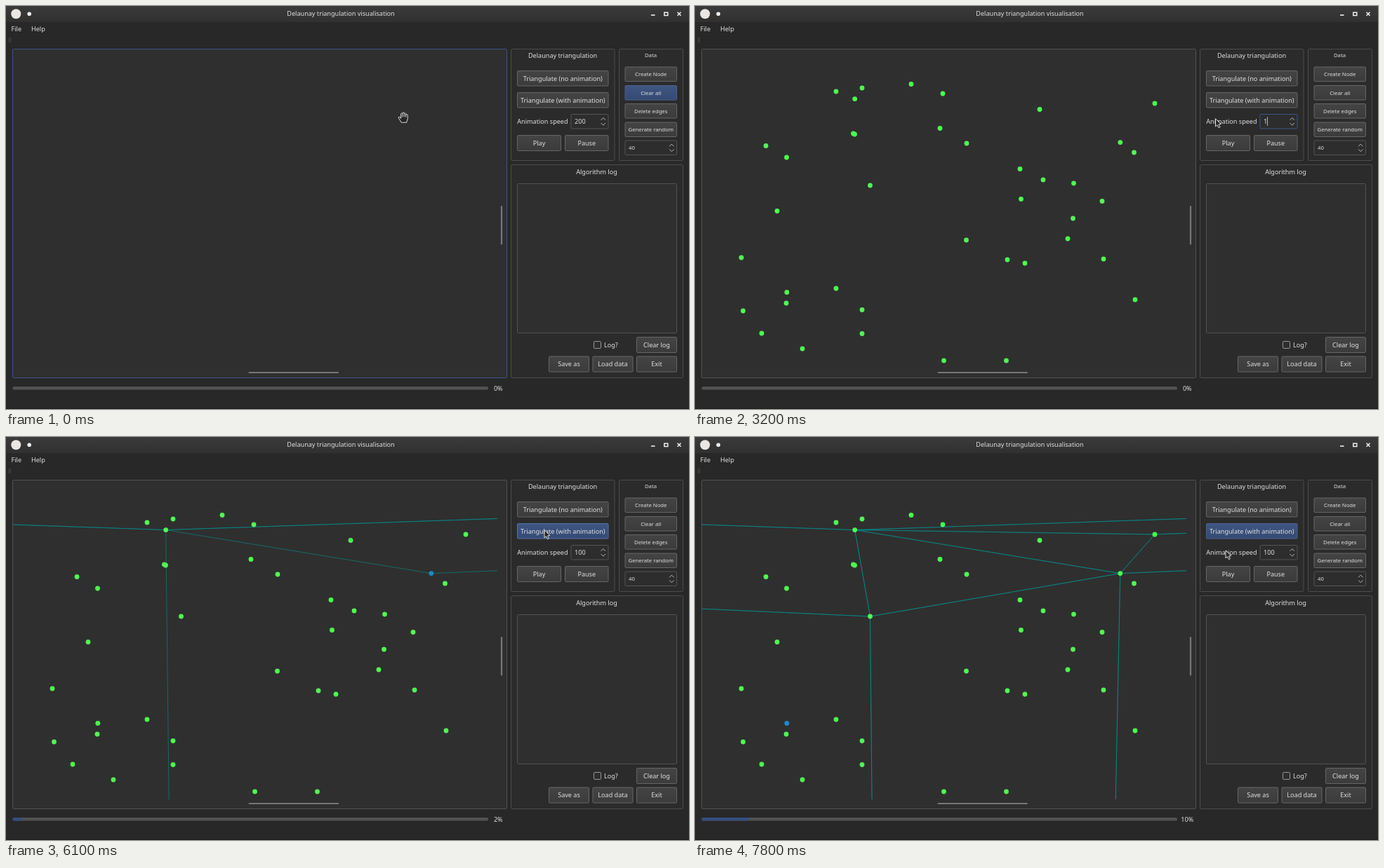
An HTML page that plays this animation: 973x575 px, repeating every 8 s.

```html
<!DOCTYPE html>
<html lang="en">
<head>
<meta charset="utf-8">
<title>Delaunay triangulation visualisation</title>
<style>
  html, body { margin: 0; width: 100%; height: 100%; overflow: hidden; background: #282828; }
  svg { display: block; width: 973px; height: 575px; font-family: "Noto Sans", sans-serif; }
  text { fill: #e0e0e0; white-space: pre; }
</style>
</head>
<body>
<svg id="stage" viewBox="0 0 973 575"></svg>
<script>
const LOOP = 8000, STEP = 100;
const BLUE = '#3b5688', BIG = 9.1, SMALL = 7.72;

// x, y, w, h, label, font size
const buttons = [
  [728.5, 92.5, 129.5, 21.5, 'Triangulate (no animation)', BIG],
  [728.5, 123.5, 129.5, 21.5, 'Triangulate (with animation)', BIG],
  [728.5, 184.5, 62, 22, 'Play', BIG],
  [796.5, 184.5, 61.5, 22, 'Pause', BIG],
  [882, 87, 73.5, 20.5, 'Create Node', SMALL],
  [882, 113.5, 73.5, 20.5, 'Clear all', SMALL],
  [882, 139.5, 73.5, 20.5, 'Delete edges', SMALL],
  [882, 166, 73.5, 20.5, 'Generate random', SMALL],
  [898.5, 472.5, 57, 22, 'Clear log', BIG],
  [773.5, 500, 57, 22, 'Save as', BIG],
  [836, 500, 57, 22, 'Load data', BIG],
  [898.5, 500, 57, 22, 'Exit', BIG]
];
const view = [9.5, 61.5, 704, 469];
const speedBox = [805, 154.5, 53, 20.5];

const nodes = [
  [201, 122], [238, 117], [308, 111.5], [353, 125], [491, 147.5], [225.5, 182], [227.5, 183],
  [349, 174.5], [387, 196], [625.5, 209], [101, 199.5], [130.5, 216], [463, 232.5], [496, 248],
  [539.5, 253], [464.5, 275.5], [580, 278.5], [117, 292.5], [538.5, 303], [531, 332],
  [386.5, 334], [445, 362], [470, 367], [582, 361], [66, 359], [201, 403], [130, 424],
  [68.5, 435], [238, 433.5], [627, 419], [95, 467], [238, 467.5], [153, 489], [354.5, 506], [443.5, 506]
];
// L, R and D are the far corners of the enclosing triangle
const corner = {
  L: [-11300, -270], R: [12000, -270], D: [365, 12000],
  a: [227.7, 132.6], b: [605.8, 194.6], c: [249.5, 256], d: [655, 139], e: [130.8, 408.5]
};
// corners, added at, removed at
const triangles = [
  ['aLR', 5500], ['aRD', 5600, 6000], ['aLD', 5700, 6600],
  ['baR', 6100, 7400], ['bRD', 6200], ['bDa', 6300, 6600],
  ['cLD', 6800], ['caL', 6900], ['cab', 7000], ['cbD', 7100],
  ['dab', 7500], ['dbR', 7600], ['daR', 7700]
];

// time, x, y of the pointer
const path = [
  [0, 566, 159], [500, 566, 159], [800, 838, 137], [1000, 838, 137], [1100, 876, 166],
  [1500, 900, 174], [1600, 900, 174], [1700, 902, 178], [2200, 902, 178], [2300, 900, 176],
  [2500, 838, 162], [2600, 838, 162], [3000, 741.5, 160.5], [4000, 741.5, 160.5], [4200, 745, 165],
  [4600, 767, 132.5], [6700, 767, 132.5], [6800, 764, 145], [7200, 756, 161.5], [LOOP, 756, 161.5]
];

// the last value whose time has come
const at = (t, keys) => keys.filter(k => k[0] <= t).pop()[1];

function pointer(t) {
  const i = path.findIndex(k => k[0] > t);
  const [t0, x0, y0] = path[i - 1], [t1, x1, y1] = path[i];
  const f = (t - t0) / (t1 - t0);
  return [x0 + (x1 - x0) * f, y0 + (y1 - y0) * f];
}

const inside = ([px, py], [x, y, w, h]) => px >= x && px <= x + w && py >= y && py <= y + h;

const rect = ([x, y, w, h], fill, stroke = 'none', r = 1.2) =>
  `<rect x="${x}" y="${y}" width="${w}" height="${h}" rx="${r}" fill="${fill}" stroke="${stroke}"/>`;
const text = (x, y, s, size = BIG, anchor = 'middle') =>
  `<text x="${x}" y="${y + size * .36}" font-size="${size}" text-anchor="${anchor}">${s}</text>`;
const line = (d, stroke, w = 1) =>
  `<path d="${d}" fill="none" stroke="${stroke}" stroke-width="${w}"/>`;
const dot = ([x, y], r, fill) => `<circle cx="${x}" cy="${y}" r="${r}" fill="${fill}"/>`;

function spin(box, value, size, stroke) {
  const [x, y, w, h] = box, cx = x + w - 7.2, cy = y + h / 2;
  return rect(box, '#2d2d2d', stroke) + text(x + 5, cy, value, size, 'start') +
    line(`M${cx - 3.2} ${cy - 2}l3.2-3.2 3.2 3.2M${cx - 3.2} ${cy + 2.2}l3.2 3.2 3.2-3.2`, '#c8c8c8', .9);
}

function button(b, focus, hover, press) {
  const fill = press ? '#2f446c' : focus ? 'url(#active)' : 'url(#plain)';
  const stroke = hover ? '#5673a8' : focus ? '#4a628f' : '#666';
  return rect(b, fill, stroke) + text(b[0] + b[2] / 2, b[1] + b[3] / 2, b[4], b[5]);
}

const defs = `<defs>
  <linearGradient id="bar" x2="0" y2="1"><stop stop-color="#3b3b3b"/><stop offset="1" stop-color="#303030"/></linearGradient>
  <linearGradient id="plain" x2="0" y2="1"><stop stop-color="#444"/><stop offset="1" stop-color="#3b3b3b"/></linearGradient>
  <linearGradient id="active" x2="0" y2="1"><stop stop-color="#3f5682"/><stop offset="1" stop-color="#344a74"/></linearGradient>
  <clipPath id="scene"><path d="M10 62H700V517H10Z"/></clipPath></defs>`;

const frame = defs + rect([0, 0, 973, 575], '#282828', 'none', 0) +
  rect([0, 0, 973, 23], 'url(#bar)', 'none', 0) + line('M0 574.5H973', '#1c1c1c') +
  dot([14.3, 11.3], 7, '#ece6e2') + dot([33.2, 11.2], 2.8, '#eee') +
  text(477, 11, 'Delaunay triangulation visualisation') +
  line('M919 13H924.5', '#f0f0f0', 1.6) + line('M937.8 9.2H942.8V13.6H937.8Z', '#f0f0f0', 1.5) +
  line('M956.5 8.8l5 5M961.5 8.8l-5 5', '#f0f0f0', 1.5) +
  text(7.5, 33, 'File', BIG, 'start') + text(36, 33, 'Help', BIG, 'start') +
  line('M4.5 45V52M6.7 45V52', '#505050', .8) +
  rect([719.5, 61.5, 147.5, 159], '#2b2b2b', '#4c4c4c') + text(793, 71, 'Delaunay triangulation') +
  rect([873.5, 61.5, 91, 159], '#2b2b2b', '#4c4c4c') + text(918.5, 70.5, 'Data', SMALL) +
  rect([719.5, 226.5, 245, 304], '#2b2b2b', '#4c4c4c') + text(841.5, 236.5, 'Algorithm log') +
  rect([728.5, 253.5, 227, 213], '#2f2f2f', '#525252') +
  text(728.3, 165, 'Animation speed', BIG, 'start') +
  spin([882, 192, 73.5, 20.5], '40', SMALL, '#555') +
  rect([837.5, 478.5, 10, 10], '#2e2e2e', '#999') + text(852, 483.5, 'Log?', BIG, 'start');

function graph(t) {
  if (t < 1700) return '';
  const active = at(t, [[0, ''], [5200, 'a'], [5800, 'b'], [6400, 'c'], [7200, 'd'], [7800, 'e']]);
  const edges = triangles.filter(([, from, to = LOOP]) => t >= from && t < to)
    .map(([names]) => line('M' + [...names].map(n => corner[n]).join('L') + 'Z', '#009a9a99', .9)).join('');
  return `<g clip-path="url(#scene)">${edges}</g>` +
    nodes.map(p => dot(p, 3.4, '#4dff50')).join('') +
    [...'abcde'].map(n => dot(corner[n], 3.4, n === active ? '#1b8acb' : '#4dff50')).join('');
}

function speed(t, p) {
  const focused = t >= 2700 && t < 4800;
  const value = at(t, [[0, '200'], [3200, '1'], [3400, '10'], [3500, '100']]);
  const stroke = focused || inside(p, speedBox) ? BLUE : '#555';
  let s = spin(speedBox, value, BIG, stroke);
  if (focused && t < 3200) {
    const x = Math.max(810, p[0]);
    s += rect([x, 158, 826 - x, 13], '#4f78bf88', 'none', 0);
  } else if (focused) {
    s += line(`M${810.3 + value.length * 5.2} 158.5V171`, '#ddd', .8);
  }
  return s;
}

function cursor([x, y]) {
  const hand = 'M-2.8 7.2L-6.7.8Q-7.3-1-5.5-1L-3.4 1.4V-5.2Q-2.3-7-1.2-5.4V-6.4Q0-8 1.2-6.4V-5.6' +
    'Q2.5-7 3.6-5.2V-3.8Q5.2-5.2 6.2-3.6V2L4.5 7.2ZM-1.2-5.4V-.6M1.2-5.6V-.6M3.6-4V-.4';
  const arrow = 'M0 .3V11.4L2.5 9.2 4.5 13.2 6.4 12.3 4.6 8.4 7.8 8Z';
  return `<path transform="translate(${x} ${y})" d="${x < 714 ? hand : arrow}" fill="#262626"
    stroke="#f0f0f0" stroke-width=".9" stroke-linejoin="round"/>`;
}

function draw(t) {
  const p = pointer(t);
  const focus = at(t, [[0, 'Clear all'], [1700, 'Generate random'], [2700, ''], [4800, 'Triangulate (with animation)']]);
  const percent = at(t, [[0, 0], [5800, 2], [6400, 5], [7200, 7], [7800, 10]]);
  // the percentage shown halfway through the third insertion is already 5
  return frame +
    rect(view, '#2f2f2f', inside(p, view) ? BLUE : '#525252') +
    graph(t) +
    rect([704.9, 285, 2.2, 55.5], '#777') + rect([345.5, 521.9, 128.5, 2.2], '#777') +
    rect([9.5, 543, 677.5, 4.6], '#525252', 'none', 2.2) +
    (percent ? rect([9.5, 543, 677.5 * percent / 100, 4.6], '#344e7e', 'none', 2.2) : '') +
    text(701.3, 545.5, percent + '%') +
    buttons.map(b => button(b, b[4] === focus, inside(p, b), b[4] === focus && t === 4800)).join('') +
    speed(t, p) + cursor(p);
}

const stage = document.getElementById('stage');
let shown = -1;
function tick() {
  const t = Math.floor(performance.now() % LOOP / STEP) * STEP;
  if (t !== shown) stage.innerHTML = draw(shown = t);
  requestAnimationFrame(tick);
}
tick();
</script>
</body>
</html>
```
